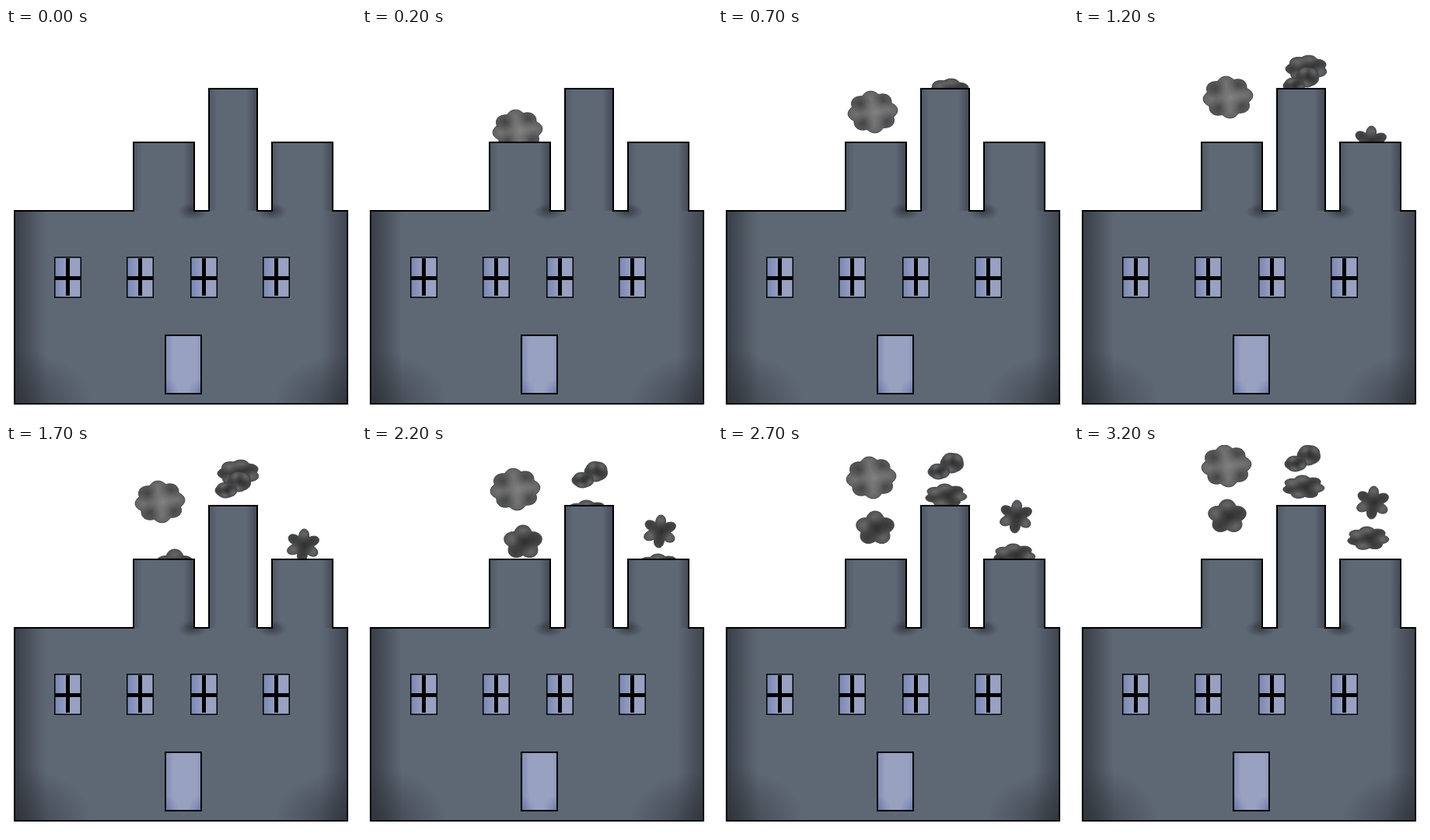
Write an HTML page with a canvas that moves like this. It is 450 by 500 pixels and loops after 3.7 s.

```html
<!DOCTYPE html>
<html lang="en">
<head>
<meta charset="utf-8">
<title>Factory smoke</title>
<style>
  html, body { margin: 0; width: 100%; height: 100%; overflow: hidden; background: #fff; }
  canvas { display: block; }
</style>
</head>
<body>
<canvas id="stage" width="450" height="500"></canvas>
<script>
const ctx = document.getElementById('stage').getContext('2d');
const LOOP = 3700, FIRST = 200, HOLD = 500, LAST_STEP = 7;
const DARK = '34,34,34', LIGHT = '146,146,146', SHADOW = '44,47,54', BLUE = '88,106,160';

// Each puff rises from one centre at step `born` to another at the last step.
// `ease` below 1 slows the rise, above 1 speeds it up; `tilt` is the angle of a lobe.
const cloud = { size: [27, 15], lobes: 7, depth: .18, tilt: -95, born: 5 };
const plume = { born: 2, ease: .6 };
const puffs = [
  { from: [200, 132], to: [196, 27], size: [32, 27], lobes: 8, depth: .14, tilt: -97, born: 1, ease: .82, fill: '#5e5e5e', core: LIGHT },
  { from: [217, 156], to: [197, 92], size: [25, 22], lobes: 5, depth: .25, tilt: -90, born: 4, ease: .65 },
  { ...plume, from: [297, 82], to: [301, 2], size: [27, 17], lobes: 7, depth: .14, tilt: -80, gone: 5 },
  { ...plume, from: [298, 93], to: [302, 13], size: [15, 13], lobes: 5, depth: .06, tilt: -45 },
  { ...plume, from: [281, 104], to: [285, 24], size: [14, 10], lobes: 5, depth: .06, tilt: 100 },
  { from: [381, 147], to: [384, 74], size: [22, 21], lobes: 6, depth: .42, tilt: -85, born: 3, ease: 1 },
  { ...cloud, from: [290, 86], to: [295, 54], ease: .6 },
  { ...cloud, from: [382, 155], to: [378, 120], ease: 1.43 }
];

const radians = degrees => degrees * Math.PI / 180;

// A closed ring of round lobes with sharp notches between them.
function lobedPath({ size: [rx, ry], lobes, depth, tilt }) {
  const path = new Path2D();
  for (let degree = 0; degree < 360; degree += 3) {
    const a = radians(degree);
    const r = 1 - depth + depth * Math.abs(Math.cos(lobes * (a - radians(tilt)) / 2));
    path.lineTo(rx * r * Math.cos(a), ry * r * Math.sin(a));
  }
  path.closePath();
  return path;
}

function glow(x, y, rx, ry, rgb, alpha) {
  ctx.save();
  ctx.translate(x, y);
  ctx.scale(rx, ry);
  const g = ctx.createRadialGradient(0, 0, 0, 0, 0, 1);
  g.addColorStop(0, `rgba(${rgb},${alpha})`);
  g.addColorStop(1, `rgba(${rgb},0)`);
  ctx.fillStyle = g;
  ctx.fillRect(-1, -1, 2, 2);
  ctx.restore();
}

// Fades horizontally from x0 (full alpha) to x1 (clear).
function edgeShade(x0, x1, top, bottom, rgb, alpha) {
  const g = ctx.createLinearGradient(x0, 0, x1, 0);
  g.addColorStop(0, `rgba(${rgb},${alpha})`);
  g.addColorStop(1, `rgba(${rgb},0)`);
  ctx.fillStyle = g;
  ctx.fillRect(Math.min(x0, x1), top, Math.abs(x1 - x0), bottom - top);
}

function shaded(path, fill, stroke, width, shade) {
  ctx.save();
  ctx.fillStyle = fill;
  ctx.fill(path);
  ctx.clip(path);
  shade();
  ctx.restore();
  ctx.strokeStyle = stroke;
  ctx.lineWidth = width;
  ctx.stroke(path);
}

function box(x, y, w, h) {
  const path = new Path2D();
  path.rect(x, y, w, h);
  return path;
}

function drawPuff(puff, step) {
  const { from, to, size: [rx, ry], lobes, tilt, born, ease, gone = Infinity, fill = '#4c4c4c', core = DARK } = puff;
  if (step < born || step >= gone) return;
  const risen = ((step - born) / (LAST_STEP - born)) ** ease;
  const [x, y] = from.map((start, i) => Math.round(start + (to[i] - start) * risen));
  ctx.save();
  ctx.translate(x, y);
  shaded(lobedPath(puff), fill, '#383f4f', 1, () => {
    for (let i = 0; i < lobes; i++) {
      const a = radians(tilt) + i * 2 * Math.PI / lobes;
      glow(rx * .65 * Math.cos(a), ry * .65 * Math.sin(a), rx * .45, ry * .5, i % 2 ? DARK : LIGHT, .4);
    }
    glow(rx * .1, 0, rx * .6, ry * .7, core, .7);
  });
  ctx.restore();
}

const walls = new Path2D('M11 235H164V147H242V235H261V78H323V235H342V147H420V235H439V483H11Z');

function drawFactory() {
  shaded(walls, '#5e6875', '#000', 2, () => {
    edgeShade(11, 52, 235, 483, SHADOW, .75);
    edgeShade(439, 405, 235, 483, SHADOW, .6);
    glow(11, 483, 100, 70, SHADOW, .7);
    glow(439, 483, 95, 65, SHADOW, .7);
    for (const [left, right, top] of [[164, 242, 147], [261, 323, 78], [342, 420, 147]]) {
      edgeShade(left, left + 11, top, 235, SHADOW, .3);
      edgeShade(right, right - 14, top, 235, SHADOW, .55);
    }
    for (const x of [240, 342]) glow(x, 236, 20, 11, SHADOW, .7);
  });
  for (const x of [62, 155, 237, 330]) {
    shaded(box(x + .75, 294.75, 33.5, 51.5), '#98a1c2', '#000', 1.5, () => {
      edgeShade(x, x + 17, 294, 347, BLUE, .5);
    });
    ctx.fillStyle = '#000';
    ctx.fillRect(x + 15, 296, 5, 48);
    ctx.fillRect(x + 1, 319, 34, 5);
  }
  shaded(box(205, 395, 46, 75), '#99a1c1', '#000', 2, () => {
    edgeShade(205, 215, 395, 470, BLUE, .4);
    edgeShade(251, 245, 395, 470, BLUE, .25);
    for (const x of [205, 251]) glow(x, 470, 18, 20, BLUE, .6);
  });
}

function draw() {
  const time = performance.now() % LOOP;
  const step = time < FIRST ? 0 : 1 + Math.floor((time - FIRST) / HOLD);
  ctx.fillStyle = '#fff';
  ctx.fillRect(0, 0, 450, 500);
  for (const puff of puffs) drawPuff(puff, step);
  drawFactory();
  requestAnimationFrame(draw);
}
draw();
</script>
</body>
</html>
```
